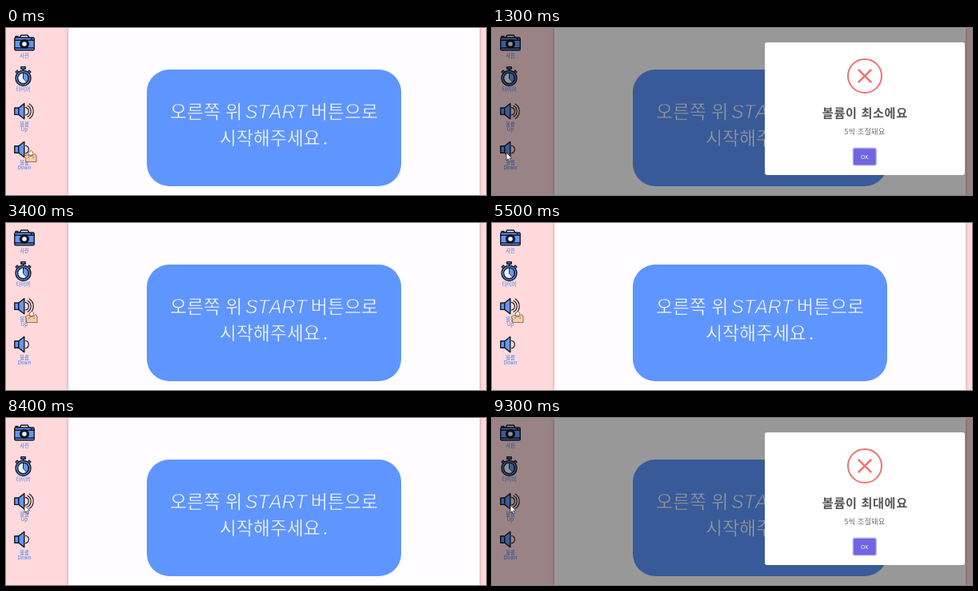
Recreate the animation shown at these times as an HTML page. Size 600x209 px, loop 9500 ms.

```html
<!DOCTYPE html>
<html lang="ko">
<head>
<meta charset="utf-8">
<title>Volume alert</title>
<style>
  :root {
    --t: 0ms;
    --dim-in: calc(565ms - var(--t)); --open: calc(580ms - var(--t)); --close: calc(2130ms - var(--t));
    --redim: calc(8565ms - var(--t)); --reopen: calc(8580ms - var(--t));
  }
  html, body { margin: 0; width: 100%; height: 100%; overflow: hidden; background: #ffd9db; }
  #stage { position: relative; width: 600px; height: 209px; overflow: hidden; }
  #stage > * { position: absolute; left: 0; top: 0; }
  #panel { left: 78px; width: 514px; height: 209px; background: #fffdff; box-shadow: 0 0 4px rgba(90, 50, 60, .4); }
  text { font-family: "Noto Sans CJK KR", "Noto Sans KR", "Noto Sans CJK JP", sans-serif; }
  /* A card-coloured outline thins the letters. */
  .big { font-size: 22.8px; font-weight: 300; fill: #fff; stroke: #5f95ff; stroke-width: .4; }
  .big .latin { font: italic 23.5px "Liberation Sans", Arial, sans-serif; font-kerning: none; stroke-width: .75; }
  .label { font-size: 6.3px; fill: #3d7df2; text-anchor: middle; }
  .ink { fill: none; stroke: #14171f; stroke-width: 1.4; stroke-linejoin: round; stroke-linecap: round; }
  .blue { fill: #6297ff; }
  .pale { fill: #eef3ff; }
  .wave { stroke-width: 1.1; }

  /* Paused animations are scrubbed by --t through their delays. */
  #dim { width: 600px; height: 209px; background: #000; opacity: 0;
    animation: dim .1s ease var(--dim-in) forwards paused, undim .1s ease var(--close) forwards paused,
      dim .1s ease var(--redim) forwards paused; }
  #stage > #modal { left: 341px; top: 18px; width: 250px; height: 166px; border-radius: 3px; background: #fff; opacity: 0;
    animation: show .3s ease var(--open) forwards paused, hide .15s ease var(--close) forwards paused,
      show .3s ease var(--reopen) forwards paused; }
  #modal svg { position: absolute; left: 0; top: 0; }
  #modal #mark { left: 101px; top: 18px; opacity: 0;
    animation: flip .5s ease var(--open) forwards paused, flip .5s ease var(--reopen) forwards paused; }
  #cross { transform-box: fill-box; transform-origin: center; opacity: 0;
    animation: cross .5s ease var(--open) forwards paused, cross .5s ease var(--reopen) forwards paused; }
  #pointer { animation: move 9.5s linear calc(0ms - var(--t)) both paused; }
  #arrow { animation: arrow 9.5s step-end calc(0ms - var(--t)) both paused; }
  #paw { animation: paw 9.5s step-end calc(0ms - var(--t)) both paused; }

  @keyframes dim { from { opacity: 0 } to { opacity: .4 } }
  @keyframes undim { from { opacity: .4 } to { opacity: 0 } }
  @keyframes show {
    0% { opacity: 1; transform: scale(.7) }
    45% { opacity: 1; transform: scale(1.05) }
    80% { opacity: 1; transform: scale(.95) }
    100% { opacity: 1; transform: scale(1) }
  }
  @keyframes hide { from { opacity: 1; transform: scale(1) } to { opacity: 0; transform: scale(.5) } }
  @keyframes flip { from { opacity: 0; transform: rotateX(100deg) } to { opacity: 1; transform: rotateX(0deg) } }
  @keyframes cross {
    0%, 50% { opacity: 0; transform: translateY(13.6px) scale(.4) }
    80% { opacity: .6; transform: translateY(-3px) scale(1.15) }
    100% { opacity: 1; transform: none }
  }
  @keyframes move {
    0%, 2% { transform: translate(22px, 152px) }
    4.2%, 22.1% { transform: translate(18px, 156px) }
    23.15% { transform: translate(13px, 136px) }
    26.3%, 100% { transform: translate(23px, 109px) }
  }
  @keyframes arrow { 0% { opacity: 0 } 3.1% { opacity: 1 } 25.2% { opacity: 0 } 88.4%, 100% { opacity: 1 } }
  @keyframes paw { 0% { opacity: 1 } 3.1% { opacity: 0 } 25.2% { opacity: 1 } 88.4%, 100% { opacity: 0 } }
</style>
</head>
<body>
<div id="stage">
  <div id="panel"></div>
  <svg width="600" height="209">
    <rect x="176" y="52" width="318" height="146" rx="28" fill="#5f95ff"/>
    <g class="big">
      <text x="205" y="112.5">오른쪽 위</text>
      <text x="299" y="112.5" class="latin">START</text>
      <text x="381" y="112.5">버튼으로</text>
      <text x="267" y="146">시작해주세요</text>
      <text x="396" y="146">.</text>
    </g>

    <g class="ink">
      <path class="pale" d="M17 12l2-3h8l2 3M12 12v-1.5h3v1.5"/>
      <rect class="blue" x="10.8" y="12" width="24.4" height="15.8" rx="1.4"/>
      <path d="M11 15.2h24M11 25h24M31 13.6h1.5"/>
      <circle cx="23" cy="20" r="5.4" style="fill:#14171f"/>
      <circle class="pale" cx="23" cy="20" r="2.8" stroke="none"/>
    </g>
    <g class="ink">
      <path d="M21.5 51v3M13.3 56.3l-1.2-1.4 2-1.8 1.2 1.4M29.7 56.3l1.2-1.4-2-1.8-1.2 1.4"/>
      <rect class="blue" x="18.8" y="48.6" width="5.4" height="2.6"/>
      <circle class="blue" cx="21.5" cy="62.8" r="9.5"/>
      <circle class="pale" cx="21.5" cy="62.8" r="6.9"/>
      <path class="blue" stroke-width=".9" d="M21.5 62.8v-6.5a6.5 6.5 0 0 1 4.6 11.1z"/>
    </g>
    <g id="speaker" class="ink">
      <rect class="blue" x="10.8" y="100" width="5" height="8.4"/>
      <path class="blue" d="M15.8 100l7-5.4v19.2l-7-5.4z"/>
      <path class="wave" d="M24.4 99.4a4.9 4.9 0 0 1 0 9.6"/>
    </g>
    <path class="ink wave" d="M27 97.2a8 8 0 0 1 0 14M29.2 95a11 11 0 0 1 0 18.4"/>
    <use href="#speaker" y="47.8"/>

    <g class="label">
      <text x="23" y="36.5">사진</text>
      <text x="21.5" y="79">타이머</text>
      <text x="23" y="122.7">볼륨</text>
      <text x="23" y="129.3">Up</text>
      <text x="23" y="170.6">볼륨</text>
      <text x="23" y="177">Down</text>
    </g>
  </svg>

  <div id="dim"></div>

  <div id="modal">
    <svg id="mark" width="48" height="48" fill="none" stroke="#f07272">
      <circle cx="24" cy="24" r="21" stroke-width="2"/>
      <path id="cross" d="M15.8 15.8l16.4 16.4M32.2 15.8l-16.4 16.4" stroke-width="2.6"/>
    </svg>
    <svg width="250" height="166" text-anchor="middle">
      <text id="title" x="125.3" y="94.4" font-size="15.2" font-weight="600" letter-spacing=".6" fill="#555"></text>
      <text x="124.8" y="115.4" font-size="9.4" fill="#767676">5씩 조절돼요</text>
      <rect x="109.6" y="131.6" width="30.4" height="23" rx="3" fill="#b8b3ef"/>
      <rect x="111" y="133" width="27.6" height="20.2" rx="2" fill="#7066e0"/>
      <text x="124.8" y="145.7" font-size="7" fill="#fff" style="font-family:'Open Sans',sans-serif">OK</text>
    </svg>
  </div>

  <svg width="600" height="209">
    <g id="pointer">
      <path id="arrow" d="M0 0v9.6l2.2-2 1.6 3.6 1.6-.7-1.6-3.5h3z" fill="#fff" stroke="#222" stroke-width=".7"/>
      <g id="paw" stroke="#6d4d35" stroke-width=".8" stroke-linejoin="round">
        <path d="M6.4 6.6L6 4.4 9.4 1.2 12 4 10.6 7.6z" fill="#fff3e6"/>
        <path d="M.8 8.4L4.6 6.4 8 8.4 11.4 7.8 14.2 5.4 16 8.4V15.6H2.6L2.8 11z" fill="#f8cda5"/>
        <path d="M5 10.4l2-.8M11.4 10.6l1.8-1" fill="none"/>
      </g>
    </g>
  </svg>
</div>
<script>
  const LOOP = 9500, STEP = 100;
  const root = document.documentElement;
  const title = document.getElementById('title');
  const start = performance.now();
  let shown = -1;

  function draw() {
    const t = Math.floor((performance.now() - start) % LOOP / STEP) * STEP;
    if (t !== shown) {
      shown = t;
      root.style.setProperty('--t', t + 'ms');
      title.textContent = t < 5000 ? '볼륨이 최소에요' : '볼륨이 최대에요';
    }
    requestAnimationFrame(draw);
  }
  draw();
</script>
</body>
</html>
```
